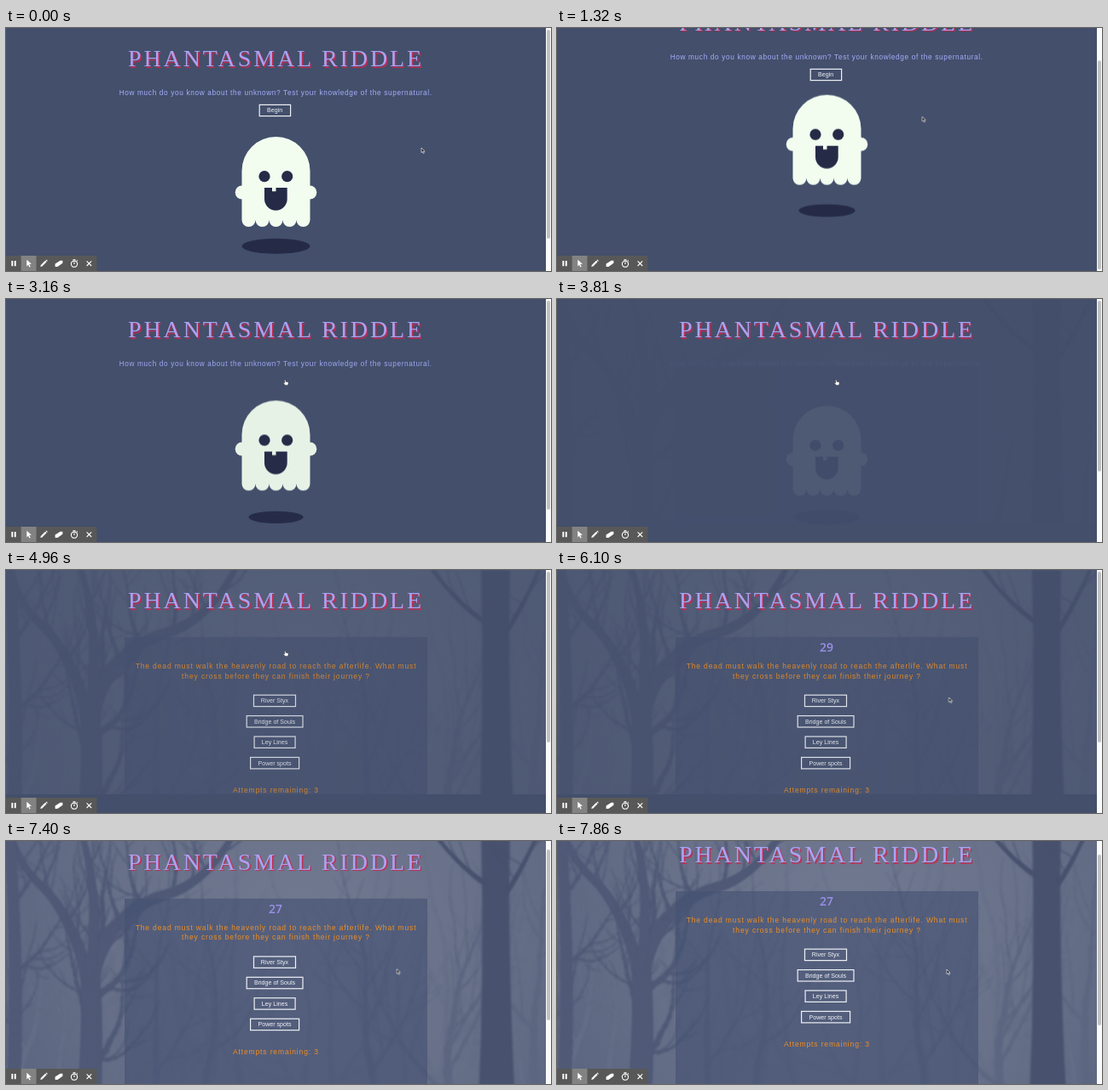
Write an HTML page with a canvas that moves like this. It is 639 px wide and 286 px high and loops after 8 s.

```html
<!DOCTYPE html>
<html lang="en">
<head>
<meta charset="utf-8">
<title>Phantasmal Riddle</title>
<style>
@property --scroll { syntax: '<length>'; inherits: true; initial-value: 0px; }

html, body { margin: 0; width: 100%; height: 100%; overflow: hidden; background: #434f6b; }
.stage { position: relative; width: 639px; height: 286px; overflow: hidden; animation: scroll 8s linear infinite; }
.page { position: absolute; inset: 0; transform: translateY(calc(var(--scroll) * -1)); }
.page > *, .overlay { position: absolute; left: 0; top: 0; overflow: visible; }

text { text-anchor: middle; font-family: 'Liberation Sans', Arial, sans-serif; }
.title { font: 28px 'Liberation Serif', 'Times New Roman', serif; letter-spacing: 2.9px; fill: #a9a3f3; text-shadow: 1.5px 1.5px 1px #c42b50; }
.lead { font-size: 8.3px; letter-spacing: .63px; fill: #a4adfa; }
.ask { font-size: 8.5px; letter-spacing: .87px; fill: #ee8e22; }
.button text { font-size: 7.1px; fill: #f0f3f8; }
.button rect { fill: none; stroke: #eef1f6; stroke-width: 1.2; }
.clock { font: 600 14px 'Open Sans', sans-serif; fill: #9b8fe8; }

.forest { animation: forest 8s linear infinite; }
.intro { animation: leave 8s ease-in-out infinite; }
.begin { animation: hide 8s step-end infinite; }
.quiz { animation: enter 8s linear infinite; }
.bob { animation: bob 8s ease-in-out infinite; }
.shadow { transform-box: fill-box; transform-origin: center; animation: shrink 8s ease-in-out infinite; }
.t29 { animation: t29 8s step-end infinite; }
.t28 { animation: t28 8s step-end infinite; }
.t27 { animation: t27 8s step-end infinite; }
.bar { position: absolute; right: 0; top: 0; width: 6.5px; height: 286px; background: #fafafa; }
.thumb { position: absolute; left: 1.2px; top: 2px; width: 4px; border-radius: 2px; background: #c1c1c1;
  transform: translateY(calc(var(--scroll) * var(--ratio))); animation: thumb 8s step-end infinite; }
.cursor { animation: point 8s linear infinite; }
.arrow { animation: arrow 8s step-end infinite; }
.hand { animation: hand 8s step-end infinite; }

@keyframes scroll {
  0%, 14.9% { --scroll: 0px; }
  16.5% { --scroll: 42px; }
  18.1% { --scroll: 45px; }
  23% { --scroll: 10.5px; }
  26.2%, 85.7% { --scroll: 0px; }
  86.5% { --scroll: 2px; }
  98.2%, 100% { --scroll: 20px; }
}
@keyframes thumb {
  0% { height: 246px; --ratio: .86; }
  46.5%, 100% { height: 201px; --ratio: .7; }
}
@keyframes forest {
  0%, 46.2% { opacity: 0; clip-path: inset(0 0 56px 0); }
  50.9% { opacity: .18; }
  62%, 86.4% { opacity: .4; clip-path: inset(0 0 56px 0); }
  86.41%, 100% { opacity: 1; clip-path: inset(0); }
}
@keyframes leave { 0%, 37.4% { opacity: 1; } 49.9%, 100% { opacity: 0; } }
@keyframes hide { 0% { opacity: 1; } 37.3%, 100% { opacity: 0; } }
@keyframes enter { 0%, 55.2% { opacity: 0; } 62% { opacity: .82; } 65.2%, 86.4% { opacity: .9; } 86.5%, 100% { opacity: 1; } }
@keyframes bob {
  0%, 26.25%, 52.5%, 100% { transform: none; }
  13.125%, 39.375% { transform: translateY(-8.5px); }
}
@keyframes shrink {
  0%, 26.25%, 52.5%, 100% { transform: none; }
  13.125%, 39.375% { transform: scale(.8); }
}
@keyframes t29 { 0% { opacity: 0; } 65% { opacity: 1; } 77.25%, 100% { opacity: 0; } }
@keyframes t28 { 0% { opacity: 0; } 77.25% { opacity: 1; } 89.75%, 100% { opacity: 0; } }
@keyframes t27 { 0% { opacity: 0; } 89.75%, 100% { opacity: 1; } }
@keyframes arrow { 0% { opacity: 1; } 31% { opacity: 0; } 66%, 100% { opacity: 1; } }
@keyframes hand { 0% { opacity: 0; } 31% { opacity: 1; } 66%, 100% { opacity: 0; } }
@keyframes point {
  0%, 4.5% { transform: translate(487px, 141px); }
  14.9% { transform: translate(429px, 104px); }
  23% { transform: translate(425px, 105px); }
  26.2% { transform: translate(371px, 92px); }
  29.5% { transform: translate(369px, 90px); }
  31.4%, 65.6% { transform: translate(327px, 95px); }
  67.1% { transform: translate(400px, 104px); }
  69% { transform: translate(487px, 147px); }
  70.9%, 75.5% { transform: translate(487px, 174px); }
  76.2%, 86.5% { transform: translate(459.5px, 150px); }
  98.2%, 100% { transform: translate(457px, 151px); }
}
</style>
</head>
<body>
<div class="stage">
  <div class="page">
    <canvas class="forest" width="639" height="320"></canvas>
    <svg width="639" height="410">
      <text class="title" x="316.5" y="45">PHANTASMAL RIDDLE</text>

      <g class="intro">
        <text class="lead" x="316.2" y="79.3">How much do you know about the unknown? Test your knowledge of the supernatural.</text>
        <g class="button begin"><rect x="297.2" y="90.4" width="36.4" height="13.2"/><text x="315.2" y="99.4">Begin</text></g>
        <ellipse class="shadow" cx="316.5" cy="256.8" rx="40" ry="9" fill="#252b47"/>
        <g class="bob">
          <g class="bob" fill="#f2fdf0"><circle cx="276.7" cy="193.5" r="8"/><circle cx="356.3" cy="193.5" r="8"/></g>
          <path fill="#f2fdf0" d="M276.5 226V168a40 40 0 0 1 80 0v58a8 8 0 0 1-16 0a8 8 0 0 1-16 0a8 8 0 0 1-16 0a8 8 0 0 1-16 0a8 8 0 0 1-16 0z"/>
          <g fill="#252b47">
            <circle cx="303" cy="174.7" r="6.6"/><circle cx="329.7" cy="174.7" r="6.6"/>
            <path d="M303 188h9v4.3h4.5V188H329.7v13.3a13.35 13.35 0 0 1-26.7 0z"/>
          </g>
        </g>
      </g>

      <g class="quiz">
        <text class="ask" x="316.5" y="116.2">The dead must walk the heavenly road to reach the afterlife. What must</text>
        <text class="ask" x="316.5" y="127.7">they cross before they can finish their journey ?</text>
        <g class="button"><rect x="290.5" y="147.2" width="49" height="13.4"/><text x="315" y="156.3">River Styx</text></g>
        <g class="button"><rect x="282.2" y="171.6" width="65.8" height="13.4"/><text x="315" y="180.7">Bridge of Souls</text></g>
        <g class="button"><rect x="291.1" y="196" width="48" height="13.4"/><text x="315" y="205.1">Ley Lines</text></g>
        <g class="button"><rect x="286.6" y="220.5" width="57" height="13.4"/><text x="315" y="229.6">Power spots</text></g>
        <text class="ask" x="316.4" y="262">Attempts remaining: 3</text>
      </g>
      <text class="clock t29" x="316" y="96.3">29</text>
      <text class="clock t28" x="316" y="96.3">28</text>
      <text class="clock t27" x="316" y="96.3">27</text>
    </svg>
  </div>

  <div class="bar"><div class="thumb"></div></div>

  <svg class="overlay" width="639" height="286">
    <path fill="#585858" d="M0 268h106.5v18H0z"/>
    <path fill="#828282" d="M17.7 268h17.8v18H17.7z"/>
    <g fill="#fff">
      <path d="M6.4 274h1.9v6.2H6.4zM9.8 274h1.9v6.2H9.8z"/>
      <path d="M24.3 272.8l5.6 5-2.6.3 1.5 2.9-1.3.6-1.4-2.9-1.8 1.7z"/>
      <path d="M40.3 281l.5-2.1 5.2-5.2 1.6 1.6-5.2 5.2zM46.5 273.2l.8-.8 1.6 1.6-.8.8z"/>
      <path d="M57.6 277.6l6-3.8h2.8v3l-6 4.3h-2.8z"/>
      <path d="M78.5 272.2h3v1.2h-3z"/>
    </g>
    <g fill="none" stroke="#fff" stroke-width="1.1">
      <circle cx="80" cy="277.7" r="3.6"/><path d="M80 275.5v2.5M83 274.3l.8-.8"/>
      <path d="M94.6 274.4l5.6 5.6M100.2 274.4l-5.6 5.6"/>
    </g>
    <g class="cursor">
      <path class="arrow" d="M0 0v5.6l1.3-1.2 1 2.2 1-.5-1-2h1.8z" fill="#222" stroke="#eee" stroke-width=".7"/>
      <path class="hand" d="M-.3 3V.6Q.3-.3 1 .6v1.6l2.6.6q.7.3.5 1.2L3.6 6.4H.4L-1.8 4q.1-1 1.5-.1z" fill="#fff" stroke="#333" stroke-width=".5"/>
    </g>
  </svg>
</div>

<script>
const canvas = document.querySelector('.forest');
const ctx = canvas.getContext('2d');
let seed = 29;
const random = () => (seed = (seed * 16807) % 2147483647) / 2147483647;
const spread = size => (random() - .5) * size;

function branch(x, y, angle, length, width) {
  if (width < .7 || y < -30) return;
  const endX = x + Math.sin(angle) * length;
  const endY = y - Math.cos(angle) * length;
  ctx.lineWidth = width;
  ctx.beginPath();
  ctx.moveTo(x, y);
  ctx.lineTo(endX, endY);
  ctx.stroke();
  branch(endX, endY, angle * .85 + spread(.34), length * .96, width * .87);
  if (random() < .5) {
    const side = random() < .5 ? -1 : 1;
    branch(endX, endY, angle + side * (.45 + random() * .5), length * .8, width * .46);
  }
}

// A curved limb that tapers from one width to another and sprouts twigs.
function limb(x0, y0, cx, cy, x1, y1, from, to) {
  const steps = 24;
  const at = (a, c, b, t) => (1 - t) ** 2 * a + 2 * t * (1 - t) * c + t * t * b;
  let x = x0, y = y0;
  for (let i = 1; i <= steps; i++) {
    const t = i / steps;
    const nextX = at(x0, cx, x1, t), nextY = at(y0, cy, y1, t);
    ctx.lineWidth = from + (to - from) * t;
    ctx.beginPath();
    ctx.moveTo(x, y);
    ctx.lineTo(nextX, nextY);
    ctx.stroke();
    if (i % 6 === 0) branch(nextX, nextY, spread(2.2), 13, to * .4);
    [x, y] = [nextX, nextY];
  }
}

function grove(color, blur, trees) {
  ctx.strokeStyle = color;
  ctx.filter = `blur(${blur}px)`;
  trees.forEach(([x, width, lean]) => branch(x, 335, lean, 27, width));
}

function drawForest() {
  const mist = ctx.createRadialGradient(345, 120, 20, 345, 120, 380);
  mist.addColorStop(0, '#717990');
  mist.addColorStop(.55, '#687189');
  mist.addColorStop(1, '#5b6580');
  ctx.fillStyle = mist;
  ctx.fillRect(0, 0, 639, 320);
  ctx.lineCap = 'round';

  grove('#646d87', 1.6, Array.from({ length: 14 }, (_, i) => [20 + i * 45 + spread(24), 5 + random() * 4, spread(.2)]));
  grove('#5d6681', 1, [[175, 9, .05], [235, 8, -.06], [430, 9, .04], [520, 11, -.03], [622, 12, 0]]);

  ctx.strokeStyle = ctx.fillStyle = '#505a77';
  ctx.filter = 'blur(.8px)';
  limb(97, 320, 103, 230, 98, 160, 27, 21);
  limb(100, 175, 118, 92, 195, 72, 17, 11);
  limb(195, 72, 240, 55, 268, 0, 11, 6);
  limb(96, 170, 75, 95, 42, 65, 14, 8);
  limb(42, 65, 15, 40, 5, 0, 8, 5);
  limb(98, 165, 112, 80, 88, 0, 12, 6);
  limb(8, 320, 16, 170, 4, 0, 16, 12);

  ctx.strokeStyle = ctx.fillStyle = '#48526e';
  ctx.beginPath();
  ctx.moveTo(557, 0);
  ctx.quadraticCurveTo(561, 160, 554, 320);
  ctx.lineTo(597, 320);
  ctx.quadraticCurveTo(588, 150, 591, 0);
  ctx.fill();
  limb(588, 70, 605, 45, 625, 0, 5, 3);
  limb(560, 60, 530, 40, 500, 0, 5, 3);

  ctx.filter = 'none';
  ctx.fillStyle = 'rgba(68, 82, 115, .62)';
  ctx.fillRect(139, 79, 355, 241);
}

drawForest();
</script>
</body>
</html>
```
